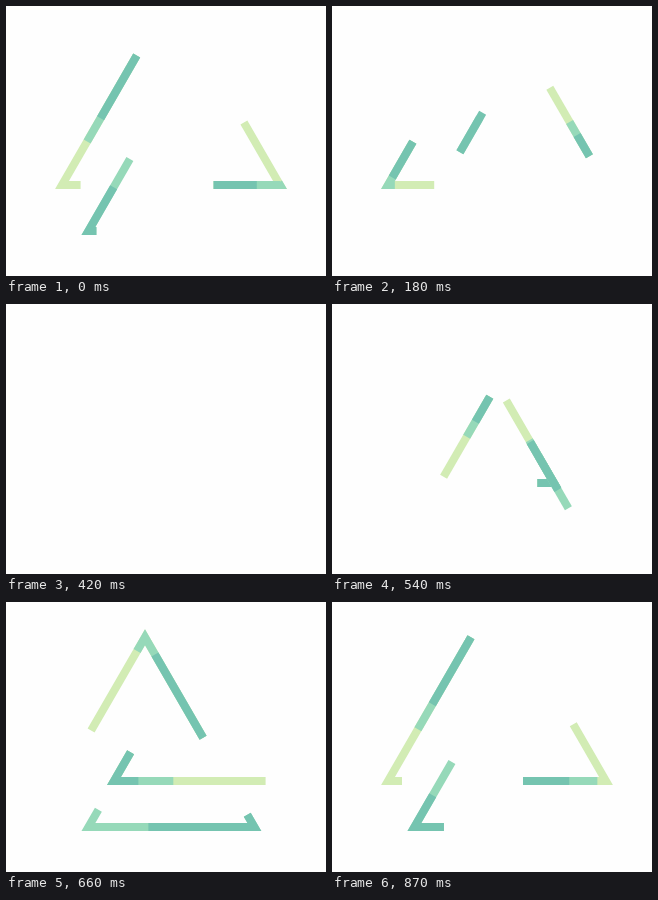
These frames come from a looping animation (320x270 px, 0.9 s). An HTML page:

```html
<!DOCTYPE html>
<html lang="en">
<head>
<meta charset="utf-8">
<title>Triangle loader</title>
<style>
  html, body { margin: 0; width: 100%; height: 100%; overflow: hidden; background: #fefefe; }
  svg { display: block; width: 100vw; height: 100vh; }
  path { fill: none; stroke-width: 8; stroke-miterlimit: 4; }
</style>
</head>
<body>
<svg id="stage" viewBox="0 0 320 270"></svg>
<script>
const LOOP = 900, STEP = 30, START = 420, RISE = 270;
const SIDE = 166, HEIGHT = SIDE * Math.sqrt(3) / 2;
const SPEED = 3 * SIDE / LOOP, REACH = 252;
const COLORS = ['#d2ecb4', '#96d9b9', '#75c4b0']; // light, mid, dark
const stage = document.getElementById('stage');

// Corners of an upright triangle from its bottom left one
const corners = (x, y) => ({
  left: [x, y],
  right: [x + SIDE, y],
  top: [x + SIDE / 2, y - HEIGHT]
});

const one = corners(56, 179), two = corners(82.4, 225), three = corners(108, 179);

// Piecewise linear value through [time, value] knots
function along(knots, t) {
  if (t <= knots[0][0]) return knots[0][1];
  for (let i = 1; i < knots.length; i++) {
    const [t0, v0] = knots[i - 1], [t1, v1] = knots[i];
    if (t <= t1) return v0 + (v1 - v0) * (t - t0) / (t1 - t0);
  }
  return knots[knots.length - 1][1];
}

// Tail turns evenly, the three heads swell and shrink together
const spin = (base, parts) => u => {
  const tail = base + SPEED * u;
  const size = REACH * (u < RISE ? u / RISE : (LOOP - u) / (LOOP - RISE));
  return [tail, ...parts.map(p => tail + p * size)];
};

const TAIL = [[37, -160], [480, 158], [660, 257], [900, 403]];
const MID = [[37, -160], [120, -24], [240, 186], [480, 249], [660, 297], [900, 403]];
const DARK = [[37, -160], [120, -45], [240, 106], [480, 216.5], [660, 302.5], [900, 403]];

function sweep(u) {
  const tail = along(TAIL, u);
  return [tail, tail, along(MID, u), along(DARK, u)];
}

const shapes = [
  { ring: [one.right, one.top, one.left], ends: spin(-SIDE / 2, [1, 0.59, 0.43]) },
  { ring: [three.left, three.right, three.top], ends: spin(-SIDE, [0.825, 0.413, 0.257]) },
  { ring: [two.right, two.left, two.top], ends: sweep }
];

for (const shape of shapes) {
  shape.paths = COLORS.map(color => {
    const path = document.createElementNS('http://www.w3.org/2000/svg', 'path');
    path.setAttribute('stroke', color);
    return stage.appendChild(path);
  });
}

function pointAt(ring, d) {
  const k = Math.floor(d / SIDE), f = d / SIDE - k;
  const i = ((k % 3) + 3) % 3;
  const [ax, ay] = ring[i], [bx, by] = ring[(i + 1) % 3];
  return (ax + (bx - ax) * f).toFixed(2) + ' ' + (ay + (by - ay) * f).toFixed(2);
}

function trace(ring, from, to) {
  if (to - from < 0.1) return '';
  const pts = [pointAt(ring, from)];
  for (let k = Math.floor(from / SIDE) + 1; k * SIDE < to; k++) pts.push(pointAt(ring, k * SIDE));
  pts.push(pointAt(ring, to));
  return 'M' + pts.join('L');
}

function draw(ms) {
  const t = Math.floor((ms + 0.5) / STEP) * STEP % LOOP;
  const u = (t - START + LOOP) % LOOP;
  for (const { ring, ends, paths } of shapes) {
    const [tail, ...heads] = ends(u);
    heads.forEach((head, i) => paths[i].setAttribute('d', trace(ring, tail, head)));
  }
}

function tick(now) {
  draw(now);
  requestAnimationFrame(tick);
}

draw(0);
requestAnimationFrame(tick);
</script>
</body>
</html>
```
